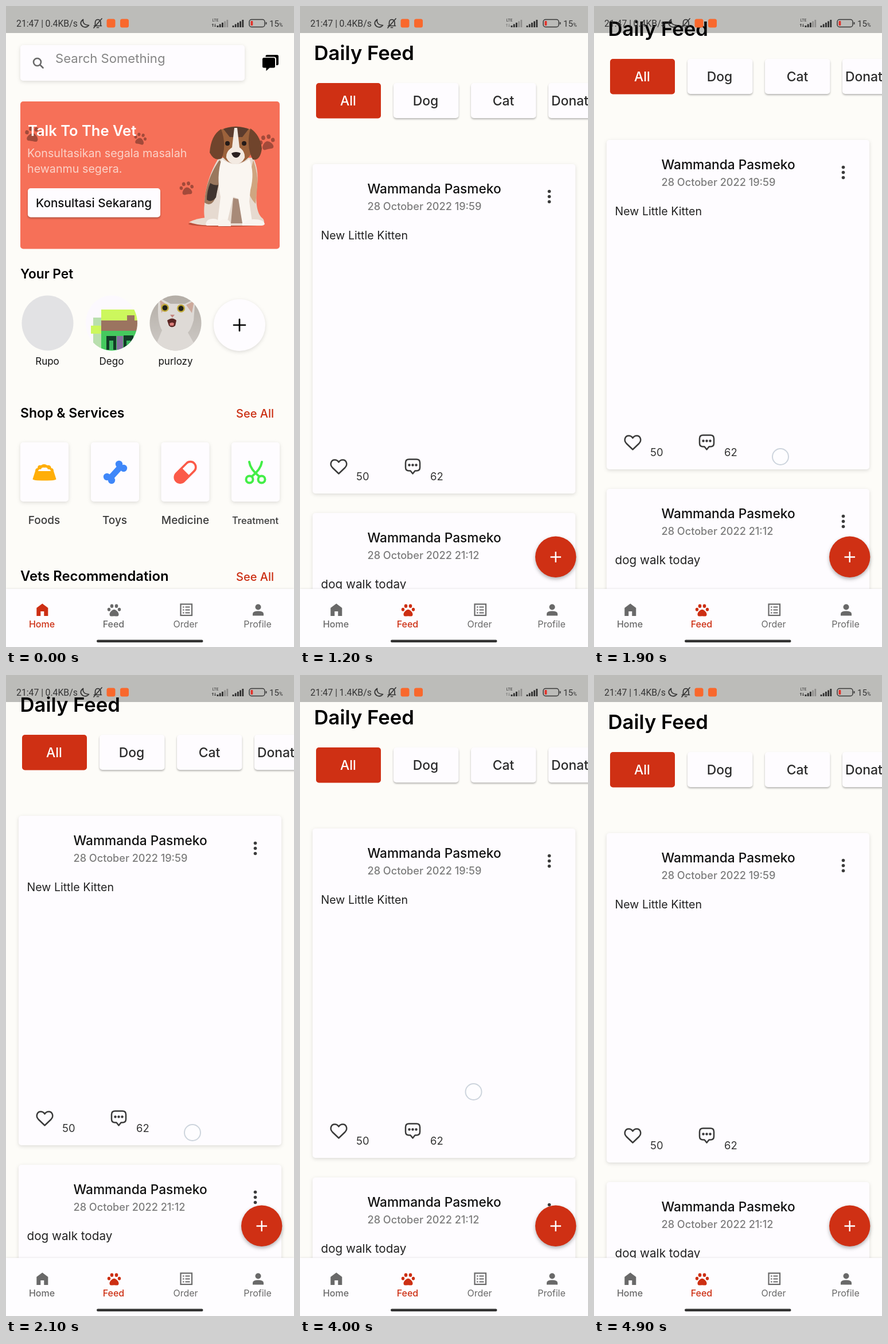
An HTML page for the animation above (5000 ms loop, 502x1115 px).

```html
<!DOCTYPE html>
<html lang="id">
<head>
<meta charset="utf-8">
<title>Pet care app</title>
<style>
  html, body { margin: 0; width: 100%; height: 100%; overflow: hidden; background: #fdfcf8; }
  svg { display: block; }
  #stage { width: 502px; height: 1115px; }
  text { font-family: Inter, "Open Sans", sans-serif; }
  .m { font-weight: 500; }
  .s { font-weight: 600; }
  .c { text-anchor: middle; }
  .status text { font-family: Roboto, sans-serif; }
  .card { fill: #fefcff; filter: drop-shadow(0 2px 3px rgba(0, 0, 0, .13)); }
  .chip { fill: #fefcff; filter: drop-shadow(0 2px 1.5px rgba(0, 0, 0, .28)); }
  .line { fill: none; stroke: currentColor; stroke-linecap: round; stroke-linejoin: round; }

  .anim { animation: 5s step-end infinite; }
  .home { animation-name: home; }
  .feed { animation-name: feed; }
  .tab-home { animation-name: tabHome; }
  .tab-feed { animation-name: tabFeed; }
  .scroll { animation-name: scroll; }
  .speed-a { animation-name: speedA; }
  .speed-b { animation-name: speedB; }
  .data { animation-name: data; }
  .tap { animation-name: tap; }
  .drag-a { animation-name: dragA; }
  .drag-b { animation-name: dragB; }
  .pull { animation-name: pull; }
  .glow { animation-name: glow; }

  @keyframes home { 0% { visibility: visible } 18%, 100% { visibility: hidden } }
  @keyframes feed { 0% { visibility: hidden } 18%, 100% { visibility: visible } }
  @keyframes tabHome { 0% { color: #cd2f13 } 18%, 100% { color: #696969 } }
  @keyframes tabFeed { 0% { color: #696969 } 18%, 100% { color: #cd2f13 } }
  @keyframes scroll {
    0% { transform: none }
    34% { transform: translateY(-10px) }
    36% { transform: translateY(-28px) }
    38% { transform: translateY(-42px) }
    40% { transform: translateY(-50px) }
    42% { transform: translateY(-30px) }
    44%, 78% { transform: none }
    80% { transform: translateY(-8px) }
    82% { transform: translateY(-38px) }
    84% { transform: translateY(-70px) }
    86% { transform: translateY(-80px) }
    88% { transform: translateY(-62px) }
    90% { transform: translateY(-26px) }
    92%, 100% { transform: none }
  }
  @keyframes speedA { 0% { opacity: 1 } 70%, 100% { opacity: 0 } }
  @keyframes speedB { 0% { opacity: 0 } 70%, 100% { opacity: 1 } }
  @keyframes data { 0% { opacity: 1 } 18% { opacity: .4 } 34% { opacity: 1 } 58% { opacity: .4 } 94%, 100% { opacity: 1 } }
  @keyframes tap { 0% { opacity: 0 } 14% { opacity: 1 } 18%, 100% { opacity: 0 } }
  @keyframes dragA { 0% { opacity: 0 } 34% { opacity: 1 } 44%, 100% { opacity: 0 } }
  @keyframes dragB { 0% { opacity: 0 } 78% { opacity: 1 } 92%, 100% { opacity: 0 } }
  @keyframes pull {
    0% { opacity: 0; transform: translateY(-50px) }
    46% { opacity: 1; transform: translateY(-40px) }
    48% { opacity: 1; transform: translateY(-18px) }
    50% { opacity: 1; transform: none }
    52%, 100% { opacity: 0; transform: none }
  }
  @keyframes glow {
    0% { opacity: 0 } 46% { opacity: .03 } 48% { opacity: .06 } 50% { opacity: .07 }
    52% { opacity: .04 } 54% { opacity: .02 } 56%, 100% { opacity: 0 }
  }
</style>
</head>
<body>
<svg id="stage" viewBox="0 0 502 1115">
  <defs>
    <g id="paw" fill="currentColor">
      <ellipse cx="-9" cy="-1.5" rx="2.7" ry="3"/>
      <ellipse cx="-4" cy="-7.5" rx="2.8" ry="3.2"/>
      <ellipse cx="4" cy="-7.5" rx="2.8" ry="3.2"/>
      <ellipse cx="9" cy="-1.5" rx="2.7" ry="3"/>
      <path d="M0-1.500C3.500-1.500 8.500 4 8 7.500C7.500 11.500 4 10 0 10S-7.500 11.500-8 7.500C-8.500 4-3.500-1.500 0-1.500Z"/>
    </g>
    <g id="touch"><circle r="14" fill="#fff" fill-opacity=".45" stroke="#cdd4dd" stroke-width="2"/></g>
    <g id="bars">
      <path d="M1.500 0v-3M5.700 0v-5.500M9.900 0v-8" stroke="#2f2f2f" stroke-width="2.800"/>
      <path d="M14.100 0v-10.500M18.300 0v-13" stroke="currentColor" stroke-width="2.800"/>
    </g>
    <g id="post">
      <text class="m" x="117.500" y="326" font-size="22.700" fill="#111">Wammanda Pasmeko</text>
      <g fill="#3c3c3c"><circle cx="434.500" cy="322.500" r="2.800"/><circle cx="434.500" cy="331.500" r="2.800"/><circle cx="434.500" cy="340.500" r="2.800"/></g>
    </g>
    <clipPath id="face2"><ellipse cx="184" cy="551.500" rx="45" ry="48"/></clipPath>
    <clipPath id="face3"><ellipse cx="295.500" cy="551.500" rx="45" ry="48"/></clipPath>
    <linearGradient id="fur" x2="0" y2="1"><stop stop-color="#b3ada6"/><stop offset="1" stop-color="#cfcbc7"/></linearGradient>
  </defs>

  <rect width="502" height="1115" fill="#fdfcf8"/>

  <g class="anim home">
    <rect class="card" x="25" y="68" width="391" height="62" rx="5"/>
    <g class="line" color="#696969" stroke-width="2.600"><circle cx="54.500" cy="97.500" r="6.500"/><path d="M59.500 102.500l5 5"/></g>
    <text x="86" y="99" font-size="22.100" fill="#858585">Search Something</text>
    <path d="M455 85h17.500q2.500 0 2.500 2.500v13q0 2.500-2.500 2.500h-1.500v-10.500q0-4-4-4h-14.500v-1q0-2.500 2.500-2.500z"/>
    <path d="M449.500 90h17q2.500 0 2.500 2.500v12.500q0 2.500-2.500 2.500h-7l-6 5.500v-5.500h-4q-2.500 0-2.500-2.500v-12.500q0-2.500 2.500-2.500z"/>

    <rect x="25" y="166" width="452" height="256.500" rx="5" fill="#f67058"/>
    <g color="#a34a3a">
      <use href="#paw" transform="translate(47 223) rotate(8) scale(1.200)"/>
      <use href="#paw" transform="translate(234 231) rotate(12) scale(.93)"/>
      <use href="#paw" transform="translate(455 237) rotate(-12) scale(1.200)"/>
      <use href="#paw" transform="translate(315 317) rotate(-8) scale(1.050)"/>
    </g>
    <text class="s" x="38" y="226" font-size="25.500" fill="#fff">Talk To The Vet</text>
    <g font-size="19.700" fill="#fbd2c8">
      <text x="37" y="263">Konsultasikan segala masalah</text>
      <text x="37" y="289.500">hewanmu segera.</text>
    </g>
    <rect class="chip" x="38" y="317" width="231" height="50.500" rx="5"/>
    <text class="m c" x="153" y="349.500" font-size="20.700" fill="#111">Konsultasi Sekarang</text>

    <!-- puppy -->
    <ellipse cx="384" cy="379" rx="66" ry="5" fill="#a9432f" opacity=".75"/>
    <path d="M319 376q14-7 30-8l12 13q-24 2-42-5z" fill="#e9dcd0"/>
    <path d="M371 264C358 284 347 314 346 344Q343 372 352 382H446Q453 377 448 370C437 362 435 342 437 318Q442 286 431 264Z" fill="#e6dad0"/>
    <path d="M372 268C358 288 347 314 346 342q11 8 18-6c6-18 10-40 13-62z" fill="#9a785e"/>
    <path d="M356 308q8 5 14 3l-4 22q-8 10-16 4 0-15 6-29z" fill="#40342f"/>
    <path d="M431 268q9 24 7 46l-3 30q-14-14-14-36z" fill="#cfa580"/>
    <path d="M376 266Q400 284 424 266Q434 290 426 320L424 340 430 382H412L405 335 396 332 384 382H368L374 332Q366 296 376 266Z" fill="#faf6f1"/>
    <path d="M396 334l9 2 7 42h-20z" fill="#a88a78"/>
    <path d="M348 380q1-10 13-10t12 12h-23zM370 383q0-12 11-12t11 12zM415 382q0-11 17-11t19 8q-1 3-6 3z" fill="#f8f3ee"/>
    <path d="M373 216Q400 203 429 216Q438 237 428 256Q417 274 400 274T374 256Q364 237 373 216Z" fill="#9c623b"/>
    <path d="M379 214Q400 206 423 214L412 228H390Z" fill="#5c3c2d"/>
    <path d="M398 212h5l4 34q10 7 9 18-5 11-16 11t-16-11q-1-11 10-18z" fill="#f3eae2"/>
    <path d="M375 214Q357 225 355 255Q363 271 376 265Q385 242 375 214ZM426 213Q443 224 446 248Q443 270 430 267Q418 244 426 213Z" fill="#70442c"/>
    <circle cx="386" cy="239" r="4" fill="#241a18"/><circle cx="415" cy="239" r="4" fill="#241a18"/>
    <path d="M393 256q8-4 16 0-2 7-8 8-6-1-8-8z" fill="#2a2020"/>

    <text class="s" x="25" y="474" font-size="22.700">Your Pet</text>
    <ellipse cx="72.500" cy="551.500" rx="45" ry="48" fill="#e2e2e4"/>
    <g clip-path="url(#face2)">
      <path fill="#fcf9fe" d="M139 503h90v97h-90z"/>
      <path fill="#ccf75d" d="M166 528h64v20h-64zM148 556h18v14h-18z"/>
      <path fill="#9b7460" d="M166 547h64v18h-64z"/>
      <path fill="#9b7460" d="M211 538h13v10h-13z"/>
      <path fill="#45c95e" d="M166 565h64v35h-64z"/>
      <path fill="#b9dfae" d="M152 542h14v14h-14zM152 570h14v26h-14z"/>
      <path fill="#123c27" d="M175 574h17v24h-17zM205 573h17v24h-17z"/>
      <path fill="#886fa0" d="M193 574h11v24h-11z"/>
      <path fill="#3cb860" d="M180 582h7v16h-7zM210 582h7v16h-7z"/>
    </g>
    <g clip-path="url(#face3)">
      <path d="M250 503h91v97h-91z" fill="url(#fur)"/>
      <path d="M266 507l21 11h25l18-9-3 38q-5 17-10 21l18 32h-78l15-36q-10-16-6-57z" fill="#dedad6"/>
      <path d="M268 511l13 9-10 14zM328 513l-14 7 10 14z" fill="#cda99b"/>
      <g fill="#c1aa3b"><circle cx="277" cy="525" r="7"/><circle cx="305" cy="526" r="7"/></g>
      <circle cx="277" cy="525" r="4.500" fill="#202018"/><circle cx="305" cy="526" r="4.500" fill="#202018"/>
      <path d="M286 537h8l-4 5z" fill="#c48680"/>
      <path d="M281 547q9-7 16 0l-2 9q-6 5-11 0z" fill="#5a2523"/><path d="M285 552q5-3 8 0l-1 4h-6z" fill="#db7f7b"/>
    </g>
    <g class="c" font-size="17" fill="#111">
      <text x="72" y="624">Rupo</text><text x="184" y="624">Dego</text><text x="295.500" y="624">purlozy</text>
    </g>
    <circle class="card" cx="407" cy="555" r="45"/>
    <path d="M397 555h20M407 545v20" class="line" color="#000" stroke-width="2.700"/>

    <text class="s" x="25" y="716" font-size="23">Shop &amp; Services</text>
    <text class="m" x="401" y="716" font-size="20" fill="#cb2f13">See All</text>
    <rect class="card" x="25" y="759" width="84" height="103" rx="5"/>
    <rect class="card" x="148" y="759" width="84" height="103" rx="5"/>
    <rect class="card" x="270.500" y="759" width="84" height="103" rx="5"/>
    <rect class="card" x="393" y="759" width="84" height="103" rx="5"/>
    <path d="M51 809q0-5 4-5 0-6 6-5 5-4 11 0 6-1 7 5 4 0 4 5l4.500 14q0 2.500-20.500 2.500t-20.500-2.500z" fill="#ffae08"/>
    <path d="M56 809q1-4 5-3 1-4 6-3 5-1 6 3 4-1 5 3z" fill="#fefcff"/>
    <g fill="#3f87f9"><circle cx="197" cy="797" r="6.200"/><circle cx="205" cy="804" r="6.200"/><circle cx="176" cy="819" r="6.200"/><circle cx="184" cy="825" r="6.200"/><path d="M180 823l21-23" stroke="#3f87f9" stroke-width="10.500"/></g>
    <g transform="translate(312.500 811) rotate(-45)">
      <rect x="-22" y="-9.500" width="44" height="19" rx="9.500" fill="none" stroke="#fb5a48" stroke-width="3.600"/>
      <path d="M1-9.500v19h-13.500a9.500 9.500 0 0 1 0-19z" fill="#fb5a48"/>
    </g>
    <g class="line" color="#43ee47" stroke-width="4"><circle cx="424.500" cy="823.500" r="6"/><circle cx="445.500" cy="823.500" r="6"/><path d="M424 793q2 13 17 25M446 793q-2 13-17 25"/></g>
    <g class="m c" font-size="19" fill="#3a3a3a">
      <text x="66.500" y="900.500">Foods</text><text x="189.500" y="900.500">Toys</text><text x="312.500" y="900.500">Medicine</text>
      <text x="434.500" y="900.500" font-size="16.600">Treatment</text>
    </g>
    <text class="s" x="25" y="1000" font-size="23.800">Vets Recommendation</text>
    <text class="m" x="401" y="1000" font-size="20" fill="#cb2f13">See All</text>
  </g>

  <g class="anim feed">
    <g class="anim scroll">
      <text class="s" x="24.500" y="94" font-size="34.700">Daily Feed</text>
      <rect x="28" y="134" width="113" height="61.500" rx="5" fill="#cf3014"/>
      <rect class="chip" x="163" y="134" width="113.500" height="61" rx="5"/>
      <rect class="chip" x="298" y="134" width="113.500" height="61" rx="5"/>
      <rect class="chip" x="433" y="134" width="113.500" height="61" rx="5"/>
      <g class="m" font-size="22.900" fill="#2c2c2c">
        <text class="c" x="84" y="172.500" fill="#fff">All</text>
        <text class="c" x="219" y="172.500">Dog</text>
        <text class="c" x="354.500" y="172.500">Cat</text>
        <text x="438" y="172.500">Donation</text>
      </g>

      <rect class="card" x="22" y="275" width="458" height="573" rx="5"/>
      <use href="#post"/>
      <text class="m" x="117.500" y="354.500" font-size="18.100" fill="#7c7c7c">28 October 2022 19:59</text>
      <text x="36.500" y="406" font-size="19.600" fill="#222">New Little Kitten</text>
      <g class="line" color="#3a3a3a" stroke-width="2.500">
        <path d="M67.500 813.500L56.500 803C51 797 54.500 789.500 60.500 789.500Q65 789.500 67.500 793.500Q70 789.500 74.500 789.500C80.500 789.500 84 797 78.500 803Z"/>
        <path d="M190 788.500h13q6 0 6 6v8q0 6-6 6h-2.500l-4 5-4-5h-2.500q-6 0-6-6v-8q0-6 6-6z"/>
      </g>
      <g fill="#3a3a3a"><circle cx="190.500" cy="798.500" r="2.200"/><circle cx="196.500" cy="798.500" r="2.200"/><circle cx="202.500" cy="798.500" r="2.200"/></g>
      <g font-size="18.400" fill="#333"><text x="98" y="825">50</text><text x="227" y="825">62</text></g>

      <rect class="card" x="22" y="882" width="458" height="573" rx="5"/>
      <use href="#post" y="607"/>
      <text class="m" x="117.500" y="961.500" font-size="18.100" fill="#7c7c7c">28 October 2022 21:12</text>
      <text x="36.500" y="1013" font-size="20.700" fill="#222">dog walk today</text>
    </g>
    <circle cx="445.700" cy="958.300" r="35.700" fill="#cf3014" style="filter:drop-shadow(0 3px 3px rgba(0,0,0,.3))"/>
    <path d="M436.500 958.500h18.500M445.700 949.300v18.500" stroke="#fff" stroke-width="2.400"/>
  </g>

  <path class="anim glow" d="M0 0H502V60Q251 150 0 60Z" fill="#cf3014"/>

  <g class="status">
    <rect width="502" height="47" fill="#000" fill-opacity=".255"/>
    <g font-size="15.800" fill="#343434">
      <text x="18" y="36">21:47 |</text>
      <text class="anim speed-a" x="68.500" y="36">0.4KB/s</text>
      <text class="anim speed-b" x="68.500" y="36">1.4KB/s</text>
      <text x="459" y="36" font-size="15">15<tspan font-size="9">%</tspan></text>
      <text x="359.500" y="27" font-size="7">LTE</text>
    </g>
    <g class="line" color="#343434" stroke-width="1.700">
      <path d="M134.500 23.500Q133 33 144.500 33.500Q140 39 133.500 35.500Q126.500 29.500 134.500 23.500Z"/>
      <path d="M153.500 34.500h13M155.500 34v-5q0-5 4.500-5.500 5 .5 5 5.500v5M158.500 37.500h3M153 38l14-16"/>
    </g>
    <rect x="175.500" y="22.500" width="15" height="15" rx="3.500" fill="#f9682c"/>
    <rect x="199" y="22.500" width="15" height="15" rx="3.500" fill="#f9682c"/>
    <path class="anim data" d="M360.500 36v-5m-1.500 1.500l1.500-1.500 1.500 1.500M364.500 31v5m-1.500-1.500l1.500 1.500 1.500-1.500" fill="none" stroke="#343434"/>
    <use href="#bars" x="367.500" y="37" color="#8f8e8c"/>
    <use href="#bars" x="394.500" y="37" color="#2f2f2f"/>
    <rect x="424" y="23.500" width="27" height="13" rx="4" fill="none" stroke="#383838" stroke-width="1.500"/>
    <path d="M453.500 28v4" stroke="#383838" stroke-width="1.800"/>
    <rect x="426.500" y="26" width="3.800" height="8" rx="1" fill="#e2322a"/>
  </g>

  <g class="nav">
    <rect y="1014" width="502" height="101" fill="#fefdff" style="filter:drop-shadow(0 -1px 1.500px rgba(0,0,0,.08))"/>
    <g class="m c" font-size="16" color="#696969" fill="currentColor">
      <g class="anim tab-home">
        <path d="M63.300 1039.500l10 7.500v14h-7v-8h-6v8h-7v-14z"/>
        <text x="62.500" y="1080.500">Home</text>
      </g>
      <g class="anim tab-feed">
        <use href="#paw" x="188.500" y="1051.300"/>
        <text x="187.500" y="1080.500">Feed</text>
      </g>
      <g>
        <rect x="304.500" y="1040.500" width="19.500" height="19.500" fill="none" stroke="currentColor" stroke-width="2.200"/>
        <path d="M308 1045.500h2.500m2 0h8M308 1050.500h2.500m2 0h8M308 1055.500h2.500m2 0h8" stroke="currentColor" stroke-width="2"/>
        <text x="313" y="1080.500" font-weight="400">Order</text>
      </g>
      <g>
        <circle cx="439.500" cy="1045.500" r="5"/>
        <path d="M430 1060.500v-3q0-5 9.500-5t9.500 5v3z"/>
        <text x="438.500" y="1080.500" font-weight="400">Profile</text>
      </g>
    </g>
    <rect x="158" y="1102.500" width="185.500" height="4.500" rx="2.200" fill="#333"/>
  </g>

  <g class="anim tap"><use href="#touch" x="188" y="1078"/></g>
  <g class="anim pull"><use href="#touch" x="325" y="817"/></g>
  <g class="anim scroll">
    <g class="anim drag-a"><use href="#touch" x="325" y="826"/></g>
    <g class="anim drag-b"><use href="#touch" x="302.500" y="733"/></g>
  </g>
</svg>
</body>
</html>
```
